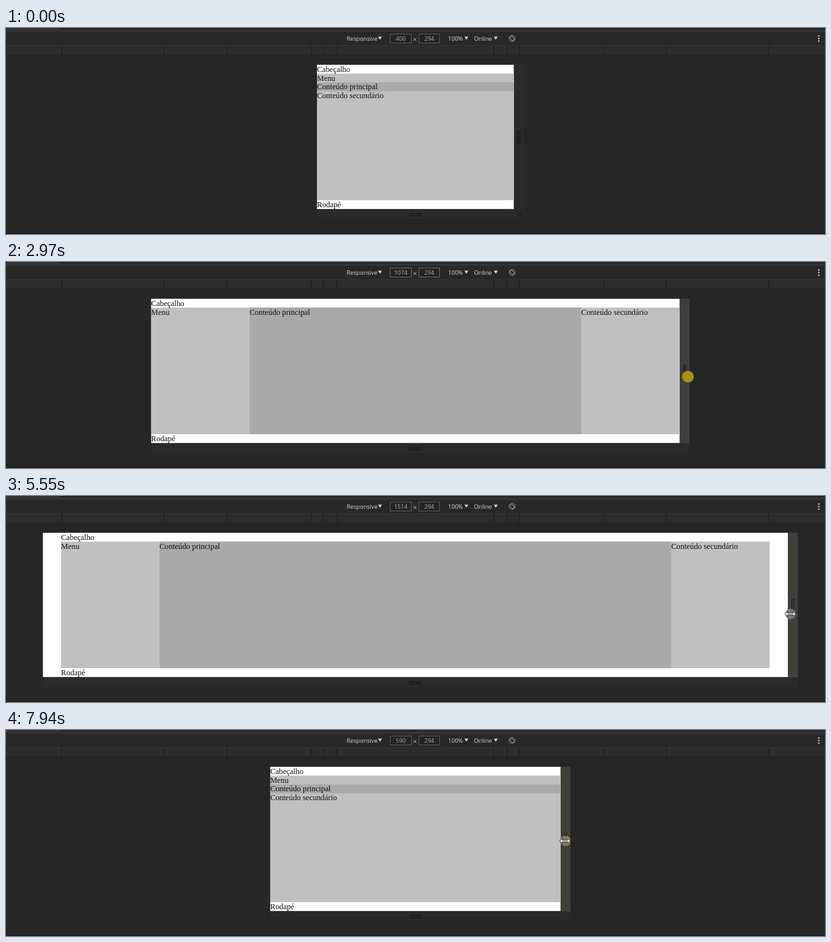
Animation of 1280x323 px, one loop 8000 ms. Source, as an HTML page:

```html
<!DOCTYPE html>
<html lang="pt">
<head>
<meta charset="utf-8">
<title>Layout responsivo</title>
<style>
  html, body { margin: 0; width: 100%; height: 100%; overflow: hidden; background: #262626; }
  svg { display: block; width: 1280px; height: 323px; }
  .ui { font: 9.1px "Open Sans", "Noto Sans", sans-serif; fill: #d2d2d2; }
  .num { fill: #a8a8a8; text-anchor: middle; }
  .page { font: 12.3px "Liberation Serif", "Times New Roman", serif; fill: #111; }
  .field { fill: #242424; }
  .grip { stroke: #111; fill: none; }
</style>
</head>
<body>
<svg viewBox="0 0 1280 323">
  <rect width="1280" height="323" fill="#262626"/>
  <rect width="1280" height="6" fill="#333"/>
  <path d="M82 0H1280V2H86Q83 2 82 0Z" fill="#232323"/>
  <rect y="6" width="1280" height="21" fill="#282828"/>
  <rect y="27" width="1280" height="1" fill="#333"/>
  <rect y="28" width="1280" height="13" fill="#2d2d2d"/>
  <g id="ruler" fill="#202020"></g>
  <rect y="322" width="1280" height="1" fill="#151515"/>

  <g class="ui">
    <text x="532.5" y="20">Responsive</text>
    <text x="691" y="20">100%</text>
    <text x="731.5" y="20">Online</text>
    <path d="M581.5 13.5h6l-3 5zM716.5 13.5h6l-3 5zM762.5 13.5h6l-3 5z"/>
    <g id="fields" stroke="#555">
      <rect class="field" x="600.5" y="9.5" width="33" height="14"/>
      <rect class="field" x="645.5" y="9.5" width="32" height="14"/>
    </g>
    <text id="size" class="num" x="617" y="20"></text>
    <text class="num" x="661.5" y="20">294</text>
    <path d="M636.8 15.8l4.6 4.6m0-4.6l-4.6 4.6" stroke="#aaa"/>
  </g>
  <g fill="none" stroke="#8f8f8f">
    <circle cx="791" cy="16.3" r="4.7"/>
    <rect x="789" y="12.8" width="4" height="7" rx="1" transform="rotate(-45 791 16.3)"/>
  </g>
  <g fill="#c4c4c4">
    <circle cx="1270.3" cy="12.5" r="1.2"/><circle cx="1270.3" cy="16.5" r="1.2"/><circle cx="1270.3" cy="20.5" r="1.2"/>
  </g>

  <g id="stage">
    <rect id="barBottom" y="284" height="15" fill="#292b29"/>
    <rect id="barRight" y="57.5" width="15.5" height="227"/>
    <path class="grip" d="M630 291.5h19M630 294.5h19"/>
    <path id="gripRight" class="grip" d="M6.3 161v21M9.3 161v21"/>
    <path id="corner" class="grip" d="M4 296l9-9M8 296l5-5"/>
    <rect id="sheet" y="57.7" height="226.1" fill="#fff"/>
    <rect id="body" y="71.5" height="198.5" fill="#c0c0c0"/>
    <rect id="main" fill="#a9a9a9"/>
    <g class="page">
      <text id="head" y="68.7">Cabeçalho</text>
      <text id="menu" y="82.5">Menu</text>
      <text id="mainText">Conteúdo principal</text>
      <text id="aside">Conteúdo secundário</text>
      <text id="foot" y="280.9">Rodapé</text>
    </g>
  </g>

  <g id="cursor">
    <circle id="solid" r="9.3" fill="#9f9419"/>
    <g id="ring">
      <circle r="8.7" fill="#3d3c26" stroke="#96905a" stroke-width="1.4"/>
      <path d="M-8 0H8" stroke="#d8d5b5" stroke-width="1.5"/>
      <path d="M0-6v4M-3 5l3-3 3 3" stroke="#c0bc92" fill="none"/>
    </g>
    <g id="arrow">
      <circle r="8.2" fill="#77776e"/>
      <path id="rim" d="M3-7.6A8.2 8.2 0 0 1 3 7.6Z" fill="#a3952c"/>
      <path d="M-9 0l4.5-4v2.8H4V-4L8 0 4 4V1.2H-4.500V4Z" fill="#eee" stroke="#222" stroke-width=".8"/>
    </g>
  </g>
</svg>
<script>
const LOOP = 8000, FIRST = 84, STEP = 77.78;
const ZOOM = 0.769, MID = 639.8, ROW = 13.85;
const COLUMN = 200, BREAK = 768, MAX = 1440;

// [step, value] pairs
const widths = [[-1, 400], [3, 400], [8, 364], [12, 372], [26, 754], [48, 1394], [53, 1510],
  [58, 1570], [61, 1578], [65, 1578], [70, 1514], [81, 1220], [88, 1030], [101, 590]];
const grabX = [[-1, 9], [26, 14.3], [48, 11.7], [61, 8], [70, 4.3], [88, 6], [101, 7.4]];
const grabY = [[-1, 172], [26, 175.5], [48, 184], [61, 184], [70, 185], [88, 185], [101, 174]];

const $ = id => document.getElementById(id);
const set = (id, attrs) => {
  for (const name in attrs) $(id).setAttribute(name, attrs[name]);
};
const show = (id, on) => set(id, { visibility: on ? "visible" : "hidden" });

function at(keys, n) {
  const i = keys.findIndex(k => k[0] >= n);
  if (i < 0) return keys[keys.length - 1][1];
  if (i === 0) return keys[0][1];
  const [a, from] = keys[i - 1], [b, to] = keys[i];
  return from + (to - from) * (n - a) / (b - a);
}

$("ruler").innerHTML = [87, 247, 345, 477, 496, 517, 762, 783, 802, 934, 1032, 1192]
  .map(x => `<rect x="${x - 0.5}" y="28" width="1.3" height="13"/>`).join("");

function drawPage(size) {
  const w = size * ZOOM, left = MID - w / 2, right = left + w;
  const inner = Math.min(size, MAX) * ZOOM, x = MID - inner / 2;
  const wide = size >= BREAK, col = COLUMN * ZOOM;

  set("sheet", { x: left, width: w });
  set("barBottom", { x: left, width: w + 15.5 });
  set("barRight", { x: right });
  set("gripRight", { transform: `translate(${right} 0)` });
  set("corner", { transform: `translate(${right} 0)` });
  set("body", { x, width: inner });
  set("main", wide
    ? { x: x + col, y: 71.5, width: inner - 2 * col, height: 198.5 }
    : { x, y: 71.5 + ROW, width: inner, height: ROW });
  for (const id of ["head", "menu", "foot"]) set(id, { x });
  set("mainText", { x: wide ? x + col : x, y: wide ? 82.5 : 82.5 + ROW });
  set("aside", { x: wide ? x + inner - col : x, y: wide ? 82.5 : 82.5 + 2 * ROW });
  $("size").textContent = size;
  return right;
}

function drawCursor(n, right) {
  const held = n >= 1;
  const look = n < 42 || (n >= 54 && n < 66) ? "solid" : n < 54 ? "ring" : "arrow";
  for (const id of ["solid", "ring", "arrow"]) show(id, held && id === look);
  show("rim", held && look === "arrow" && n > 76);
  show("corner", !held);
  set("cursor", { transform: `translate(${right + at(grabX, n)} ${at(grabY, n)})` });
  set("barRight", { fill: !held ? "#292a29" : look === "solid" ? "#3d3d3d" : "#3f4036" });
  set("fields", { stroke: n >= 14 && n < 54 ? "#6c6c4a" : "#585858" });
}

function draw(now) {
  const n = Math.floor((now % LOOP - FIRST) / STEP + 0.01);
  const size = 2 * Math.round(at(widths, n) / 2);
  drawCursor(n, drawPage(size));
  requestAnimationFrame(draw);
}
draw(0);
</script>
</body>
</html>
```
